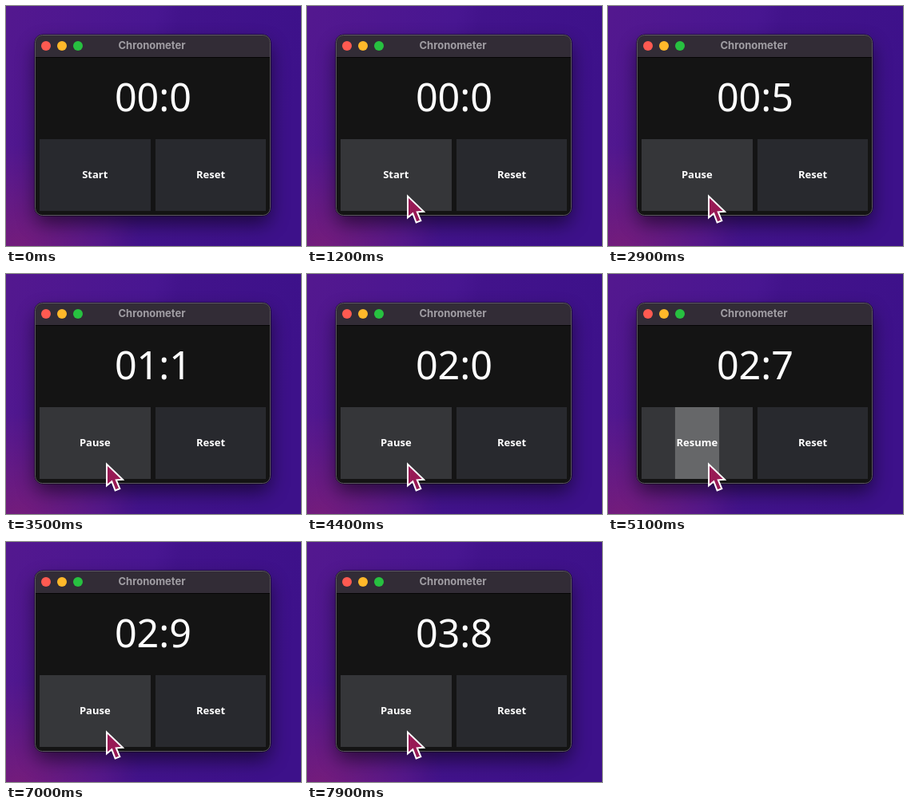
An HTML page that plays this animation: 369x301 px, repeating every 8000 ms.

```html
<!DOCTYPE html>
<html lang="en">
<head>
<meta charset="utf-8">
<title>Chronometer</title>
<style>
  html, body { margin: 0; width: 100%; height: 100%; overflow: hidden; background: #45158a; }
  svg { display: block; width: 100%; height: 100%; }
  text { text-anchor: middle; fill: #fff; font-family: "Noto Sans", "Open Sans", sans-serif; }
  .label { font-size: 13px; font-weight: 700; }
  .title { font: 700 13px Inter, "Liberation Sans", sans-serif; fill: #a09da3; }
  .time { font-size: 48.5px; }
</style>
</head>
<body>
<svg viewBox="0 0 369 301">
  <defs>
    <linearGradient id="sky" x1="0" y1="0.1" x2="1" y2="0.3">
      <stop offset="0" stop-color="#53188f"/>
      <stop offset="0.48" stop-color="#481691"/>
      <stop offset="0.56" stop-color="#42138b"/>
      <stop offset="1" stop-color="#3d118a"/>
    </linearGradient>
    <radialGradient id="glow" cx="0.04" cy="1" r="0.42">
      <stop offset="0" stop-color="#7a1d78" stop-opacity="0.85"/>
      <stop offset="1" stop-color="#7a1d78" stop-opacity="0"/>
    </radialGradient>
    <filter id="blur" x="-30%" y="-30%" width="160%" height="160%">
      <feGaussianBlur stdDeviation="12"/>
    </filter>
    <clipPath id="frame"><rect x="36.5" y="36.5" width="294" height="226" rx="9"/></clipPath>
  </defs>

  <rect width="369" height="301" fill="url(#sky)"/>
  <rect width="369" height="301" fill="url(#glow)"/>
  <rect x="37" y="48" width="293" height="225" rx="10" fill="#000" opacity="0.55" filter="url(#blur)"/>

  <g clip-path="url(#frame)">
    <rect x="36" y="36" width="295" height="227" fill="#141414"/>
    <rect x="36" y="36" width="295" height="28" fill="#322c36"/>
    <rect x="36" y="64" width="295" height="1" fill="#050505"/>
  </g>
  <rect x="36" y="36" width="295" height="227" rx="9.5" fill="none" stroke="#0c0714" stroke-width="1"/>
  <rect x="36.5" y="36.5" width="294" height="226" rx="9" fill="none" stroke="#5b5660" stroke-width="1"/>
  <circle cx="50" cy="50" r="6" fill="#ff5a51"/>
  <circle cx="70" cy="50" r="6" fill="#ffb82a"/>
  <circle cx="90" cy="50" r="6" fill="#27c140"/>
  <text class="title" x="182.5" y="54">Chronometer</text>

  <text class="time" id="time" x="184" y="132">00:0</text>

  <rect id="main" x="42" y="167" width="139" height="90" fill="#28292e"/>
  <rect id="ripple" y="167" height="90" fill="#fff"/>
  <text class="label" id="label" x="111.3" y="215.7">Start</text>
  <rect x="187" y="167" width="138" height="90" fill="#28292e"/>
  <text class="label" x="256" y="215.7">Reset</text>

  <path id="cursor" d="M1 1.5V28.3L7.3 23.2L11.6 34.4L17.3 32.2L12.8 21.3L21 20.8Z"
        fill="#981a55" stroke="#fff" stroke-width="2" stroke-linejoin="miter"/>
</svg>

<script>
const LOOP = 8000, TICK = 100;
const START = 2300, PAUSE = 5100, RESUME = 6800;
const RIPPLE_MS = 300, RIPPLE_LEAD = 67;
const BUTTON = { x: 42, w: 139 };
const el = id => document.getElementById(id);
const easeOut = v => v * (2 - v);

function tenths(t) {
  const running = Math.min(t, PAUSE) - START - TICK;
  return (Math.max(0, running) + Math.max(0, t - RESUME)) / TICK;
}

function clock(n) {
  return String(Math.floor(n / 10)).padStart(2, "0") + ":" + n % 10;
}

function caption(t) {
  if (t < START) return "Start";
  return t >= PAUSE && t < RESUME ? "Resume" : "Pause";
}

function drawRipple(t) {
  const tap = [RESUME, PAUSE, START].find(s => t >= s);
  const v = tap === undefined ? 1 : Math.min(1, (t - tap + RIPPLE_LEAD) / RIPPLE_MS);
  const done = easeOut(v), w = BUTTON.w * done;
  const r = el("ripple");
  r.setAttribute("x", BUTTON.x + (BUTTON.w - w) / 2);
  r.setAttribute("width", w);
  r.setAttribute("opacity", 0.4 * (1 - done));
}

function drawCursor(t) {
  const p = easeOut(Math.min(1, Math.max(0, (t - 200) / 300)));
  const x = 30 + 95 * p, y = 284 - 47 * p;
  el("cursor").setAttribute("transform", `translate(${x} ${y})`);
  el("cursor").setAttribute("visibility", t < 200 ? "hidden" : "visible");
  el("main").setAttribute("fill", t >= 300 && y < 257 ? "#353639" : "#28292e");
}

function draw(now) {
  const t = Math.floor(now % LOOP / TICK) * TICK;
  el("time").textContent = clock(tenths(t));
  el("label").textContent = caption(t);
  drawRipple(t);
  drawCursor(t);
}

function loop() {
  draw(performance.now());
  requestAnimationFrame(loop);
}
loop();
</script>
</body>
</html>
```
